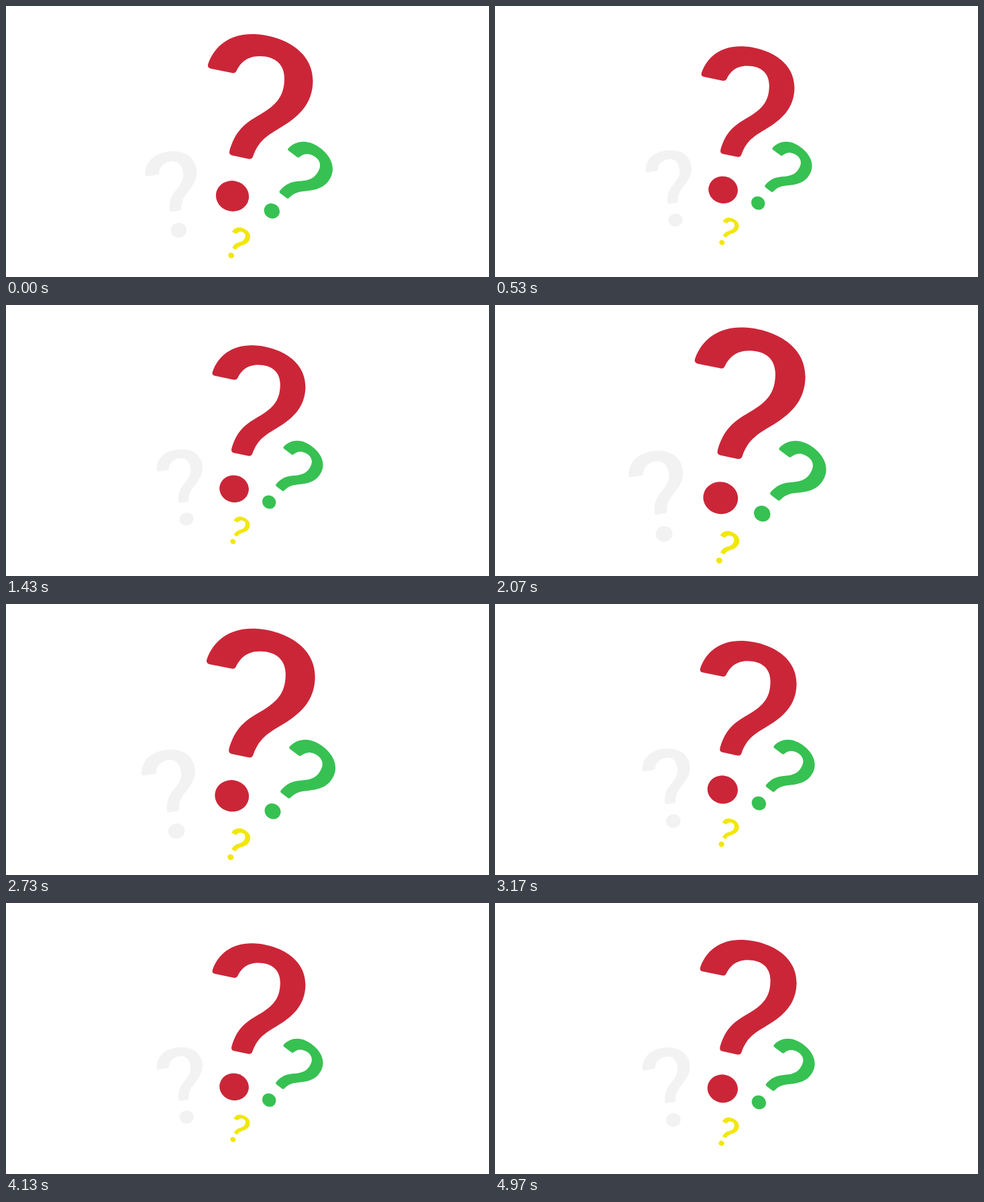
Write an HTML page that moves like this. It is 720 by 405 pixels and loops after 5.01 s.

```html
<!DOCTYPE html>
<html lang="en">
<head>
<meta charset="utf-8">
<title>Pulsing question marks</title>
<style>
  html, body { margin: 0; width: 100%; height: 100%; overflow: hidden; background: #fff; }
  svg { display: block; width: 100vw; height: 100vh; }
</style>
</head>
<body>
<svg viewBox="0 0 720 405">
  <defs>
    <!-- One mark; its dot is centred on the local origin. -->
    <g id="mark">
      <path transform="translate(-337.5 -284)" d="
        M301.3 86.5 C311 59 334 42 367 42 C403 42 457.5 62 457.5 112
        C457 147 436 166 407 183 C385 196 376 204 368.5 224
        Q367 229.5 361.5 228.5 L337 223.3 Q331.800 222 333.300 216
        C341 190 352 178 374 165 C400 150 415 138 415 108
        C415 88 402 75 378 75 C358 75 349 86 343.500 97
        Q341.500 101 337 100 L305 93.500 Q299.500 92 301.300 86.500 Z"/>
      <ellipse rx="24.700" ry="22.800" transform="rotate(12)"/>
    </g>
  </defs>
  <g id="group"></g>
</svg>
<script>
const LOOP = 5010, FRAMES = 150, PERIOD = 27;

// x, y of the dot, turn in degrees, size, colour
const marks = [
  [257.5, 335, -20.8, 0.483, '#f2f2f2'],
  [337.5, 284, 0, 1, '#cb2638'],
  [396.3, 306.3, 25.2, 0.483, '#37c152'],
  [335.6, 372.8, 13, 0.181, '#f2e70a']
];

// Pulse: step within the period, scale
const pulse = [
  [0, 1], [1, 1.033], [4, 1.1375], [5, 1.1375], [9, 1.025], [10, 1],
  [14, 0.919], [16, 0.8865], [18, 0.86], [20, 0.841], [22, 0.832], [27, 1]
];

const group = document.getElementById('group');

for (const [x, y, turn, size, colour] of marks) {
  const use = document.createElementNS('http://www.w3.org/2000/svg', 'use');
  use.setAttribute('href', '#mark');
  use.setAttribute('fill', colour);
  use.setAttribute('transform', `translate(${x} ${y}) rotate(${turn}) scale(${size})`);
  group.append(use);
}

function scaleAt(step) {
  const i = pulse.findIndex(([s]) => s > step);
  const [s0, v0] = pulse[i - 1], [s1, v1] = pulse[i];
  return v0 + (v1 - v0) * (step - s0) / (s1 - s0);
}

// 30 steps a second, with step times rounded to 10 ms
function stepAt(ms) {
  const t = Math.floor((ms % LOOP) / 10) * 10;
  return Math.min(FRAMES - 1, Math.floor((t + 4.9) * 0.03));
}

function draw(ms) {
  const k = scaleAt(stepAt(ms) % PERIOD);
  group.setAttribute('transform', `translate(360 202.5) scale(${k}) translate(-360 -202.5)`);
}

const start = performance.now();
function tick() {
  draw(performance.now() - start);
  requestAnimationFrame(tick);
}
tick();
</script>
</body>
</html>
```
